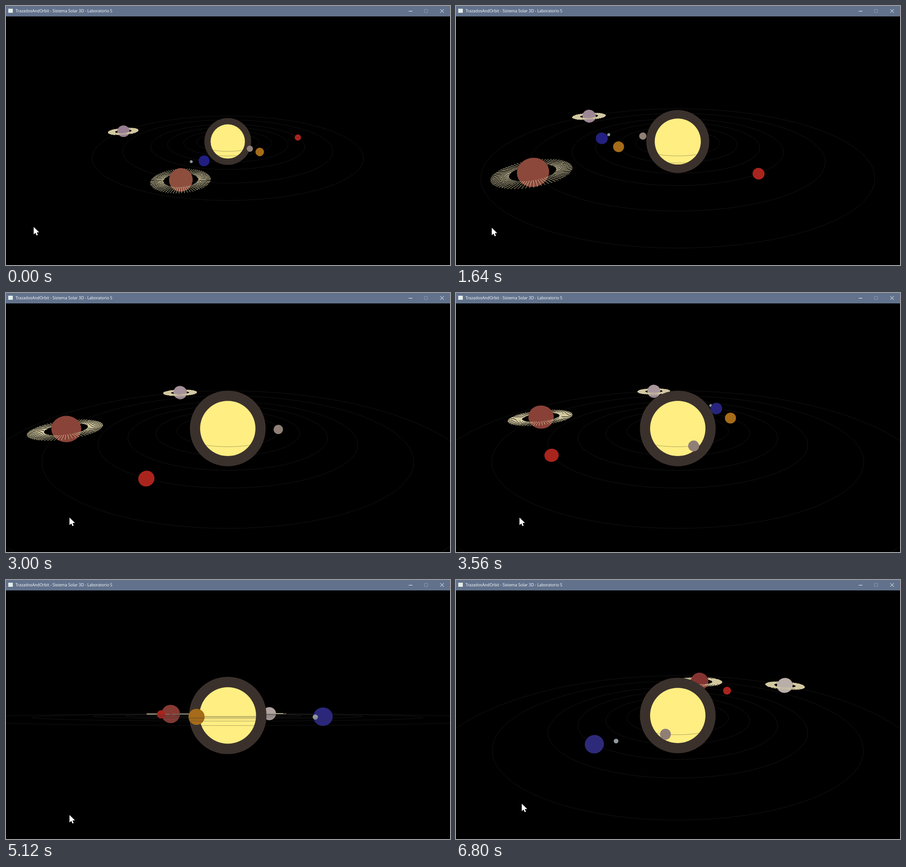
Recreate the animation shown at these times as an HTML page with a canvas. Size 979x572 px, loop 6840 ms.

```html
<!DOCTYPE html>
<html lang="es">
<head>
<meta charset="utf-8">
<title>Sistema Solar 3D</title>
<style>
  html, body { margin: 0; width: 100%; height: 100%; overflow: hidden; background: #000; }
  canvas { position: absolute; left: 0; top: 0; display: block; }
  .bar {
    position: absolute; left: 0; top: 0; width: 979px; height: 23px;
    background: #62728c; color: #fff;
    font: 8.8px/23px "Open Sans", "Noto Sans", sans-serif; white-space: pre;
  }
  .bar span { position: absolute; left: 21px; top: 0; }
  .icon { position: absolute; left: 5px; top: 6px; width: 10px; height: 9px; background: #e4ecea; }
  .bar svg { position: absolute; left: 880px; top: 0; }
</style>
</head>
<body>
<canvas id="stage" width="979" height="572"></canvas>
<div class="bar">
  <i class="icon"></i>
  <span>TrazadosAndOrbit - Sistema Solar 3D - Laboratorio 5</span>
  <svg width="99" height="23" fill="none" stroke="#fff">
    <path d="M8 11.5h8"/>
    <path d="M42.5 7.5h7v7h-7z" stroke="#8c99ad"/>
    <path d="M77.5 7l8 8m0-8l-8 8"/>
  </svg>
</div>
<script>
const ctx = document.getElementById('stage').getContext('2d');
const LOOP = 6840, STEP = 40, RAD = Math.PI / 180;
const CX = 489, CY = 299.2, FOCAL = 662.7;

// Angles in degrees; turn is the angle covered in one loop.
const PLANETS = [
  { orbit: 10, size: 0.92, start: 49, turn: 773, color: [143, 127, 118] },
  { orbit: 14, size: 1.22, start: 49, turn: 558, color: [166, 108, 25] },
  { orbit: 19, size: 1.44, start: 109.2, turn: 384, color: [32, 30, 130], end: [46, 42, 122],
    moon: { orbit: 3.37, size: 0.37, start: 170, turn: 2329, color: [143, 154, 156] } },
  { orbit: 24, size: 1.03, start: -11.3, turn: 314, color: [170, 36, 30] },
  { orbit: 32, size: 2.62, start: 109.2, turn: 172.5, color: [142, 78, 62], end: [132, 52, 48],
    ring: [3.9, 6.65] },
  { orbit: 40, size: 2.1, start: 199, turn: 120, color: [150, 125, 143], end: [186, 175, 168],
    ring: [2.92, 5.2] }
];

// The simulation runs at a slightly uneven pace: time, share of the loop done.
const PACE = [[0, 0], [1040, 0.11], [2240, 0.3], [3000, 0.407], [5120, 0.754], [6800, 1]];

const mix = (a, b, k) => a + (b - a) * k;
const ramp = (t, from, to) => Math.min(1, Math.max(0, (t - from) / (to - from)));
const ease = k => k * k * (3 - 2 * k);

function progress(t) {
  const i = PACE.findIndex(([at]) => at >= t) || 1;
  const [[t0, p0], [t1, p1]] = [PACE[i - 1], PACE[i]];
  return mix(p0, p1, ramp(t, t0, t1));
}

function place(body, done) {
  const a = (body.start + body.turn * done) * RAD;
  return { x: body.orbit * Math.cos(a), z: body.orbit * Math.sin(a) };
}

function tint({ color, end = color }, done) {
  return `rgb(${color.map((c, i) => Math.round(mix(c, end[i], done)))})`;
}

let dist, sinP, cosP;

function setCamera(distance, pitch) {
  dist = distance;
  sinP = Math.sin(pitch * RAD);
  cosP = Math.cos(pitch * RAD);
}

// The ground plane holds every body; z grows toward the viewer.
function project(x, z) {
  const d = dist - z * cosP;
  return { u: FOCAL * x / d, v: FOCAL * z * sinP / d, d };
}

// Perspective outline of a sphere, stretched away from the view centre.
function sphere(x, z, size, color) {
  const { u, v, d } = project(x, z);
  const r = Math.hypot(u, v) / FOCAL, a = Math.atan(r);
  const s = size / (d * Math.hypot(1, r)), b = Math.asin(s);
  const near = FOCAL * Math.tan(a - b), far = FOCAL * Math.tan(a + b);
  const mid = (near + far) / 2, turn = Math.atan2(v, u);
  ctx.fillStyle = color;
  ctx.beginPath();
  ctx.ellipse(CX + mid * Math.cos(turn), CY + mid * Math.sin(turn), (far - near) / 2,
    FOCAL * s / Math.sqrt(Math.cos(a) ** 2 - s * s), turn, 0, Math.PI * 2);
  ctx.fill();
}

function arc(radius, from) {
  ctx.strokeStyle = 'rgba(51,51,51,.4)';
  ctx.beginPath();
  for (let i = 0; i <= 60; i++) {
    const a = from + Math.PI * i / 60;
    const p = project(radius * Math.cos(a), radius * Math.sin(a));
    ctx.lineTo(CX + p.u, CY + p.v);
  }
  ctx.stroke();
}

// Hard-edged line, one pixel per step along its longer axis.
function pixelLine(p, q) {
  const n = Math.ceil(Math.max(Math.abs(q.u - p.u), Math.abs(q.v - p.v)));
  for (let i = 0; i <= n; i++) {
    const k = i / n;
    ctx.fillRect(Math.floor(CX + mix(p.u, q.u, k)), Math.floor(CY + mix(p.v, q.v, k)), 1, 1);
  }
}

function spokes(x, z, [inner, outer], from) {
  ctx.fillStyle = '#d2c8a0';
  for (let i = 0; i < 36; i++) {
    const a = from + Math.PI * i / 36, c = Math.cos(a), s = Math.sin(a);
    pixelLine(project(x + inner * c, z + inner * s), project(x + outer * c, z + outer * s));
  }
}

function drawPlanet(p, x, z, done) {
  const { ring, moon } = p;
  const m = moon && place(moon, done);
  const drawMoon = () => sphere(x + m.x, z + m.z, moon.size, tint(moon, done));
  if (ring) spokes(x, z, ring, Math.PI);
  if (moon && m.z < 0) drawMoon();
  sphere(x, z, p.size, tint(p, done));
  if (moon && m.z >= 0) drawMoon();
  if (ring) spokes(x, z, ring, 0);
}

function pointer(x, y) {
  ctx.fillStyle = '#fff';
  ctx.beginPath();
  [[0, 0], [0, 16.5], [4, 13], [6.5, 18.8], [9.2, 17.6], [6.8, 12], [12, 11.7]]
    .forEach(([dx, dy]) => ctx.lineTo(x + dx, y + dy));
  ctx.fill();
}

function draw(t) {
  const zoom = ramp(t, 0, 2000) ** 2;
  const move = ease(ramp(t, 1480, 2000));
  const lift = ease(ramp(t, 5160, 5760));
  const drop = ease(ramp(t, 3640, 4340)) - lift;
  setCamera(96.5 - 36.5 * zoom - 1.3 * drop, 16.6 + 1.3 * zoom - 17 * drop + lift);

  ctx.fillStyle = '#000';
  ctx.fillRect(0, 0, 979, 572);

  const done = progress(t);
  const bodies = PLANETS.map(p => ({ p, ...place(p, done) }));

  // Far half from the outside in, then the sun, then the near half outward.
  for (const { p, x, z } of [...bodies].reverse()) {
    arc(p.orbit, Math.PI);
    if (z < 0) drawPlanet(p, x, z, done);
  }
  sphere(0, 0, 7.5, '#3b312c');
  sphere(0, 0, 5.5, '#ffee82');
  for (const { p, x, z } of bodies) {
    arc(p.orbit, 0);
    if (z >= 0) drawPlanet(p, x, z, done);
  }
  pointer(61 + 79 * move + 5 * lift, 488 + 8 * move + 23 * drop - 2 * lift);
}

const start = performance.now();
function tick() {
  const t = (performance.now() - start) % LOOP;
  draw(Math.floor(t / STEP) * STEP);
  requestAnimationFrame(tick);
}
tick();
</script>
</body>
</html>
```
